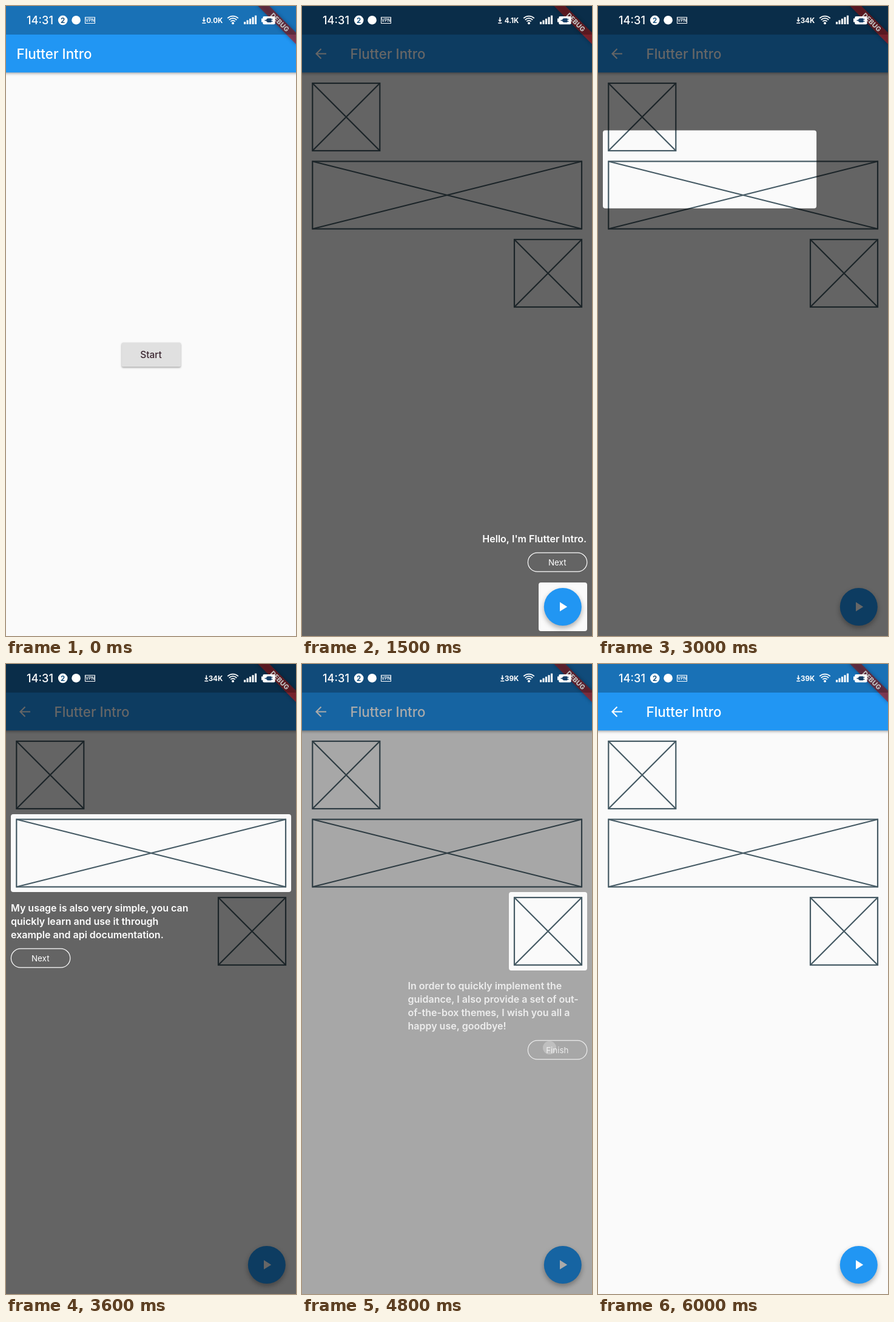
These frames come from a looping animation (478x1036 px, 6.1 s). An HTML page with a canvas:

```html
<!DOCTYPE html>
<html lang="en">
<head>
<meta charset="utf-8">
<title>Flutter Intro</title>
<style>
  html, body { margin: 0; width: 100%; height: 100%; overflow: hidden; background: #fafafa; }
  canvas { display: block; width: 478px; height: 1036px; }
</style>
</head>
<body>
<canvas id="stage" width="478" height="1036"></canvas>
<script>
const W = 478, H = 1036, LOOP = 6100, BAR = 47;
const FONT = 'Inter, "Open Sans", sans-serif';
const stage = document.getElementById('stage').getContext('2d');
const layer = document.createElement('canvas');
layer.width = W;
layer.height = H;
const layerCtx = layer.getContext('2d');

const PUSH = 420, SHOW = 582, FINISH = 4668, FADE = 300;
const boxes = [[17.3, 127, 111, 111], [17.3, 255.5, 443.7, 111], [350, 384, 111, 111]];

// Guide steps: spotlight rectangle, text, button and the tap that ends the step
const steps = [
  { hole: [390, 948, 80, 80], x: 469, y: 882, align: 'right', btn: [372, 899], label: 'Next',
    tap: 1700, dot: [412, 914], lines: ["Hello, I'm Flutter Intro."] },
  { hole: [8, 118, 129, 129], x: 8, y: 278, btn: [8, 339.5], label: 'Next',
    tap: 2800, dot: [57, 355],
    lines: ['I can help you quickly implement the', 'Step By Step guide in the Flutter', 'project.'] },
  { hole: [8, 247, 462, 128], x: 8, y: 407, btn: [8, 468], label: 'Next',
    tap: 3850, dot: [57, 484],
    lines: ['My usage is also very simple, you can', 'quickly learn and use it through', 'example and api documentation.'] },
  { hole: [341, 375, 129, 129], x: 174.5, y: 535, btn: [372, 619], label: 'Finish',
    tap: FINISH, dot: [408, 631],
    lines: ['In order to quickly implement the', 'guidance, I also provide a set of out-',
      'of-the-box themes, I wish you all a', 'happy use, goodbye!'] }
];

const ramp = (t, start, length) => Math.min(1, Math.max(0, (t - start) / length));

function bezier(x1, y1, x2, y2) {
  const at = (a, b, s) => 3 * a * s * (1 - s) ** 2 + 3 * b * s * s * (1 - s) + s ** 3;
  return x => {
    let lo = 0, hi = 1;
    for (let i = 0; i < 24; i++) {
      const mid = (lo + hi) / 2;
      if (at(x1, x2, mid) < x) lo = mid; else hi = mid;
    }
    return at(y1, y2, lo);
  };
}
const easeIn = bezier(0.42, 0, 1, 1);
const fastOutSlowIn = bezier(0.4, 0, 0.2, 1);

function text(c, str, x, y, size, weight, color, align = 'left') {
  c.font = `${weight} ${size}px ${FONT}`;
  c.fillStyle = color;
  c.textAlign = align;
  c.fillText(str, x, y);
}

function rounded(c, x, y, w, h, r) {
  c.beginPath();
  c.roundRect(x, y, w, h, r);
}

function circle(c, x, y, r, color) {
  c.fillStyle = color;
  c.beginPath();
  c.arc(x, y, r, 0, 7);
  c.fill();
}

function poly(c, points) {
  c.beginPath();
  points.forEach(([x, y]) => c.lineTo(x, y));
}

function shadowed(c, blur, dy, alpha, draw) {
  c.save();
  c.shadowColor = `rgba(0,0,0,${alpha})`;
  c.shadowBlur = blur;
  c.shadowOffsetY = dy;
  draw();
  c.restore();
}

function scaffold(c, titleX) {
  c.fillStyle = '#fafafa';
  c.fillRect(0, 0, W, H);
  shadowed(c, 5, 2, 0.4, () => {
    c.fillStyle = '#2196f3';
    c.fillRect(-10, -10, W + 20, 119.3);
  });
  text(c, 'Flutter Intro', titleX, 87, 22.4, 500, '#fff');
}

function startPage(c) {
  scaffold(c, 17.5);
  shadowed(c, 3, 1.5, 0.35, () => {
    c.fillStyle = '#e0e0e0';
    rounded(c, 190.8, 553.5, 97.2, 39.8, 2);
    c.fill();
  });
  text(c, 'Start', 239, 579, 15.5, 500, '#3b2630', 'center');
  c.fillStyle = '#e0e0e0';
}

function placeholder(c, [x, y, w, h]) {
  c.strokeRect(x, y, w, h);
  c.beginPath();
  c.moveTo(x, y);
  c.lineTo(x + w, y + h);
  c.moveTo(x + w, y);
  c.lineTo(x, y + h);
  c.stroke();
}

function guidePage(c) {
  scaffold(c, 79.5);
  c.strokeStyle = '#fff';
  c.lineWidth = 2.1;
  poly(c, [[31.5, 70.5], [23.5, 78.5], [31.5, 86.5]]);
  c.moveTo(23.5, 78.5);
  c.lineTo(40, 78.5);
  c.stroke();
  c.strokeStyle = '#455a64';
  c.lineWidth = 2.2;
  boxes.forEach(b => placeholder(c, b));
  shadowed(c, 9, 4, 0.32, () => circle(c, 429.8, 988, 31, '#2196f3'));
  c.fillStyle = '#fff';
  poly(c, [[425, 980.2], [425, 995.6], [437.2, 988]]);
  c.fill();
}

function spotlight(t) {
  let hole = steps[0].hole;
  for (let i = 1; i < steps.length; i++) {
    const k = ramp(t, steps[i - 1].tap, FADE);
    hole = hole.map((v, j) => v + (steps[i].hole[j] - v) * k);
  }
  return hole;
}

function touch(c, step, t) {
  const k = ramp(t, step.tap - 110, 60) * (1 - ramp(t, step.tap + 150, 80));
  if (k > 0) circle(c, step.dot[0], step.dot[1], 11, `rgba(255,255,255,${0.35 * k})`);
}

function panel(c, i, t) {
  const s = steps[i], last = i === steps.length - 1;
  const fadeIn = i ? ramp(t, steps[i - 1].tap + FADE, 220) : ramp(t, SHOW, FADE);
  const fadeOut = last ? ramp(t, s.tap + 90, 210) : ramp(t, s.tap, 100);
  const alpha = fadeIn * (1 - fadeOut);
  if (!alpha) return;
  c.save();
  c.globalAlpha = alpha;
  s.lines.forEach((line, n) => text(c, line, s.x, s.y + n * 22.1, 16, 600, '#fff', s.align));
  const [x, y] = s.btn;
  c.strokeStyle = '#fff';
  c.lineWidth = 1.2;
  rounded(c, x + 0.4, y + 0.2, 97.4, 31, 15.5);
  c.stroke();
  text(c, s.label, x + 48.8, y + 20.6, 13.4, 400, '#fff', 'center');
  touch(c, s, t);
  c.restore();
}

function guide(c, t) {
  const k = ramp(t, SHOW, FADE) * (1 - ramp(t, FINISH, FADE));
  if (!k) return;
  c.fillStyle = `rgba(0,0,0,${0.6 * k})`;
  c.beginPath();
  c.rect(0, 0, W, H);
  c.roundRect(...spotlight(t), 4);
  c.fill('evenodd');
  steps.forEach((s, i) => panel(c, i, t));
}

function banner(c) {
  c.save();
  c.translate(W, 0);
  c.rotate(Math.PI / 4);
  shadowed(c, 6, 0, 0.5, () => {
    c.fillStyle = 'rgba(183,28,28,0.63)';
    c.fillRect(-46, 31, 92, 13.3);
  });
  text(c, 'DEBUG', 0, 41.7, 11, 800, '#fff', 'center');
  c.restore();
}

function statusBar(c, t) {
  c.fillStyle = 'rgba(0,0,0,0.25)';
  c.fillRect(0, 0, W, BAR);
  text(c, '14:31', 34, 30.3, 18.2, 500, '#fff');

  circle(c, 93.7, 23.4, 7.8, '#fff');
  text(c, '2', 93.7, 27.6, 11.5, 700, '#14507f', 'center');
  circle(c, 115.6, 23.2, 7.3, '#fff');
  c.strokeStyle = '#fff';
  c.lineWidth = 1;
  c.strokeRect(130.5, 18.5, 16, 10);
  text(c, 'VPN', 138.5, 26.4, 7, 600, '#fff', 'center');

  const speed = t < 500 ? '0.0K' : t < 2500 ? '4.1K' : t < 4500 ? '34K' : '39K';
  text(c, speed, 357.3, 28, 11.6, 700, '#fff', 'right');
  const ax = t < 2500 ? 326.3 : 330.3;
  c.fillRect(ax - 0.8, 18.5, 1.6, 6);
  c.fillRect(ax - 3, 27.3, 6, 1.5);
  poly(c, [[ax - 3, 22.8], [ax + 3, 22.8], [ax, 26.4]]);
  c.fill();

  // Wi-Fi
  c.lineWidth = 1.8;
  for (const r of [5.2, 8.8, 12.4]) {
    c.beginPath();
    c.arc(374, 29, r, -Math.PI * 0.75, -Math.PI * 0.25);
    c.stroke();
  }
  circle(c, 374, 28.3, 2, '#fff');

  // Signal
  for (let i = 0; i < 5; i++) {
    const h = 4 + i * 2.6;
    c.fillRect(392 + i * 4.5, 30 - h, 3.1, h);
  }

  // Charging battery
  rounded(c, 423.3, 17, 20.2, 13.2, 2);
  c.fill();
  c.fillRect(421, 20.5, 3, 6);
  c.fillStyle = '#173f68';
  rounded(c, 429, 20.2, 8.5, 6.8, [3.4, 1, 1, 3.4]);
  c.fill();
  c.fillRect(426.5, 22.9, 3, 1.5);
  c.fillRect(437, 21.3, 2.6, 1.2);
  c.fillRect(437, 24.7, 2.6, 1.2);
}

function render(t) {
  const p = ramp(t, PUSH, 300);
  if (p < 1) {
    startPage(stage);
    const k = ramp(t, 300, 60) * (1 - ramp(t, 440, 80));
    if (k) circle(stage, 240, 575, 11, `rgba(150,150,150,${0.4 * k})`);
  }
  if (p > 0) {
    stage.globalAlpha = easeIn(p);
    stage.drawImage(layer, 0, (1 - fastOutSlowIn(p)) * H / 4);
    stage.globalAlpha = 1;
  }
  guide(stage, t);
  banner(stage);
  statusBar(stage, t);
}

const began = performance.now();
function tick() {
  render((performance.now() - began) % LOOP);
  requestAnimationFrame(tick);
}
guidePage(layerCtx);
tick();
</script>
</body>
</html>
```
